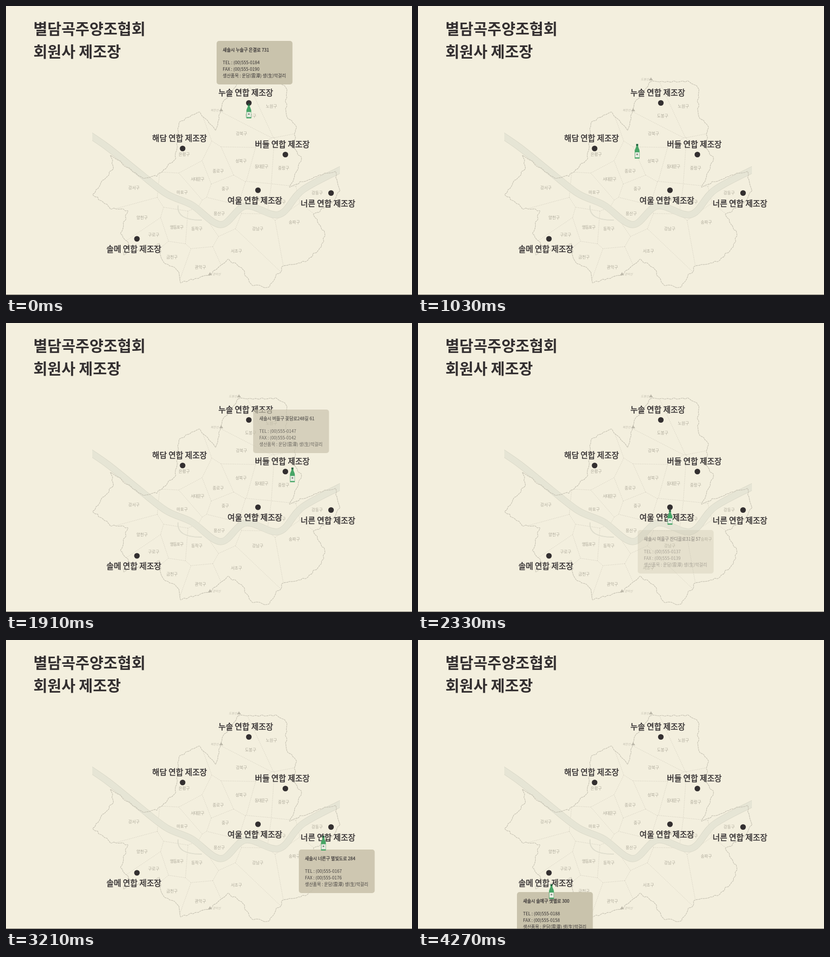
Recreate the animation shown at these times as an HTML page with a canvas. Size 800 px wide and 571 px high, loop 4.33 s.

```html
<!DOCTYPE html>
<html lang="ko">
<head>
<meta charset="utf-8">
<title>회원사 제조장</title>
<style>
html, body { margin: 0; width: 100%; height: 100%; overflow: hidden; background: #f3efde; }
canvas { display: block; }
</style>
</head>
<body>
<canvas id="stage" width="800" height="571"></canvas>
<script>
const LOOP = 4330, MOVE = 350, PAUSE = 50, FADE_IN = 170, FADE_OUT = 120;
const FONT = '"Noto Sans CJK KR", "Noto Sans CJK", "Noto Sans CJK JP", sans-serif';
const BG = '#f3efde', INK = '#332f30', PALE = '#aeaa9b';

// dot, bottle offset from the dot, panel top, time the bottle arrives
const stops = [
  { name: '누솔', dot: [478.5, 191.5], off: [0, 16], top: 69, arrive: -320,
    addr: '새솔시 누솔구 은결로 731', tel: '(00)555-0184', fax: '(00)555-0190' },
  { name: '해담', dot: [348, 281.5], off: [24, 1], top: 153, arrive: 380,
    addr: '새솔시 해담구 물결로8길 6', tel: '(00)555-0160', fax: '(00)555-0134' },
  { name: '버들', dot: [550.5, 293.5], off: [16, 4], top: 171, arrive: 1250,
    addr: '새솔시 버들구 꽃담로248길 61', tel: '(00)555-0147', fax: '(00)555-0142' },
  { name: '여울', dot: [496.5, 364], off: [0, 20], top: 409, arrive: 2222,
    addr: '새솔시 여울구 잔디골로31길 57', tel: '(00)555-0137', fax: '(00)555-0139' },
  { name: '너른', dot: [640.5, 369.5], off: [-15, 32], top: 414, arrive: 3010,
    addr: '새솔시 너른구 별빛도로 284', tel: '(00)555-0167', fax: '(00)555-0176' },
  { name: '솔메', dot: [258, 460], off: [5, 37], top: 498, arrive: 4022,
    addr: '새솔시 솔메구 샛별로 300', tel: '(00)555-0188', fax: '(00)555-0158' }
];
const districts = [
  ['도봉구', 482, 217], ['노원구', 523, 198], ['강북구', 464, 252], ['은평구', 351, 293],
  ['성북구', 463, 306], ['종로구', 418, 326], ['서대문구', 377, 342], ['동대문구', 503, 317],
  ['중랑구', 547, 320], ['마포구', 347, 368], ['중구', 432, 361], ['강서구', 252, 359],
  ['강동구', 613, 369], ['양천구', 268, 418], ['구로구', 291, 452], ['영등포구', 336, 437],
  ['동작구', 376, 440], ['용산구', 420, 410], ['금천구', 327, 496], ['관악구', 383, 516],
  ['서초구', 454, 484], ['강남구', 496, 440], ['송파구', 568, 427], ['광진구', 540, 387],
  ['성동구', 497, 381]
];
const peaks = [['도봉산', 459, 144, -12], ['북한산', 424, 205, -13], ['관악산', 402, 529, 13]];
const border = [
  [459, 150], [533, 149], [552, 160], [551, 214], [571, 238], [568, 278], [582, 301], [560, 357],
  [628, 331], [649, 328], [657, 366], [645, 386], [607, 412], [628, 450], [622, 475], [591, 505],
  [548, 512], [518, 556], [482, 550], [464, 516], [437, 501], [401, 531], [346, 546], [337, 521],
  [309, 505], [300, 470], [231, 490], [240, 471], [226, 449], [240, 404], [207, 400], [170, 372],
  [212, 320], [206, 295], [270, 340], [298, 335], [334, 302], [340, 231], [380, 209], [414, 246],
  [425, 194]
];
const river = [
  [150, 245], [200, 279], [262, 329], [316, 371], [366, 393], [423, 432],
  [472, 395], [538, 412], [585, 363], [670, 318]
];

const stage = document.getElementById('stage').getContext('2d');
const ramp = (t, start, span) => Math.max(0, Math.min(1, (t - start) / span));
const ease = u => (1 - Math.cos(Math.PI * u)) / 2;

function seeded(seed) {
  return () => (seed = seed * 16807 % 2147483647) / 2147483647;
}

// cy is the middle of the Hangul glyphs
function text(c, str, x, cy, size, { color = INK, weight = 400, align = 'left', thick = 0, style = '' } = {}) {
  c.font = `${style} ${weight} ${size}px ${FONT}`;
  c.textAlign = align;
  c.fillStyle = c.strokeStyle = color;
  c.fillText(str, x, cy + size * .38);
  if (thick) {
    c.lineWidth = thick;
    c.lineJoin = 'round';
    c.strokeText(str, x, cy + size * .38);
  }
}

// Smooth path through all points
function spline(pts) {
  const path = new Path2D();
  const at = i => pts[Math.max(0, Math.min(pts.length - 1, i))];
  path.moveTo(...pts[0]);
  for (let i = 0; i < pts.length - 1; i++) {
    const [a, b, d, e] = [at(i - 1), at(i), at(i + 1), at(i + 2)];
    path.bezierCurveTo(b[0] + (d[0] - a[0]) / 6, b[1] + (d[1] - a[1]) / 6,
      d[0] - (e[0] - b[0]) / 6, d[1] - (e[1] - b[1]) / 6, ...d);
  }
  return path;
}

// Closed border with small random nudges between the key points
function ruggedBorder() {
  const rnd = seeded(11), out = [];
  border.forEach(([x, y], i) => {
    const [u, v] = border[(i + 1) % border.length];
    const n = Math.ceil(Math.hypot(u - x, v - y) / 6);
    for (let k = 0; k < n; k++) {
      const f = k / n, nudge = () => (rnd() - .5) * 3.5;
      out.push([x + (u - x) * f + nudge(), y + (v - y) * f + nudge()]);
    }
  });
  const path = spline([...out, out[0]]);
  path.closePath();
  return path;
}

// District lines run halfway between neighbouring district names
function districtLines() {
  const path = new Path2D();
  districts.forEach(([, ax, ay], i) => districts.slice(i + 1).forEach(([, bx, by]) => {
    const mx = (ax + bx) / 2, my = (ay + by) / 2, dx = ay - by, dy = bx - ax;
    let lo = -9, hi = 9;
    for (const [, kx, ky] of districts) {
      if ((kx === ax && ky === ay) || (kx === bx && ky === by)) continue;
      const nx = kx - ax, ny = ky - ay;
      const slope = dx * nx + dy * ny;
      const gap = (kx * kx + ky * ky - ax * ax - ay * ay) / 2 - mx * nx - my * ny;
      if (slope > 0) hi = Math.min(hi, gap / slope);
      else if (slope < 0) lo = Math.max(lo, gap / slope);
      else if (gap < 0) hi = lo;
    }
    if (lo < hi) {
      path.moveTo(mx + dx * lo, my + dy * lo);
      path.lineTo(mx + dx * hi, my + dy * hi);
    }
  }));
  return path;
}

function drawRiver(c) {
  const path = spline(river);
  c.save();
  c.beginPath();
  c.rect(170, 0, 488, 571);
  c.clip();
  for (const [color, width] of [['#d9d7c7', 13.5], ['#e6e5d5', 12]]) {
    c.strokeStyle = color;
    c.lineWidth = width;
    c.stroke(path);
  }
  c.restore();
  c.beginPath();
  c.moveTo(339, 394);
  c.quadraticCurveTo(336, 424, 386, 423);
  c.strokeStyle = '#dfddcd';
  c.lineWidth = 2;
  c.stroke();
}

function drawMap(c) {
  const edge = ruggedBorder();
  c.fillStyle = BG;
  c.fillRect(0, 0, 800, 571);
  c.save();
  c.clip(edge);
  c.strokeStyle = '#d3cfbf';
  c.lineWidth = .8;
  c.setLineDash([2, 1.5]);
  c.stroke(districtLines());
  c.restore();
  drawRiver(c);
  c.strokeStyle = '#c5c1b2';
  c.lineWidth = 1.1;
  c.setLineDash([4, .8]);
  c.stroke(edge);
  c.setLineDash([]);
  for (const [name, x, y] of districts) {
    c.letterSpacing = name.length > 3 ? '-0.8px' : '0px';
    text(c, name, x, y, 8, { color: PALE, align: 'center' });
  }
  c.letterSpacing = '0px';
  for (const [name, x, y, dx] of peaks) {
    text(c, name, x + dx, y + 1, 5.8, { color: '#c2beaf', align: 'center', style: 'italic' });
    c.fillStyle = '#bdb9aa';
    c.beginPath();
    c.moveTo(x - 4, y + 3);
    c.lineTo(x, y - 3);
    c.lineTo(x + 4, y + 3);
    c.fill();
  }
  text(c, '별담곡주양조협회', 54, 45, 30, { weight: 700 });
  text(c, '회원사 제조장', 54, 90, 30, { weight: 700 });
  for (const { name, dot: [x, y], top } of stops) {
    c.fillStyle = INK;
    c.beginPath();
    c.arc(x, y, 5.5, 0, 7);
    c.fill();
    const side = top < y ? -1 : 1;
    text(c, name + ' 연합 제조장', x - 6, y + side * 20.3, 15.7, { align: 'center', thick: .45 });
  }
}

function drawPanel(c, { dot, top, addr, tel, fax }, alpha) {
  if (alpha <= 0) return;
  const x = Math.round(dot[0] - 63.5);
  c.globalAlpha = alpha;
  c.fillStyle = '#c9c3ac';
  c.beginPath();
  c.roundRect(x, top, 149.5, 86, 5);
  c.fill();
  text(c, addr, x + 12, top + 18, 8.6, { thick: .25 });
  const lines = ['TEL : ' + tel, 'FAX : ' + fax, '생산품목 : 운담(雲潭) 생(生)막걸리'];
  lines.forEach((line, i) => text(c, line, x + 12, top + 43 + i * 12.8, 8.6));
  c.globalAlpha = 1;
}

function drawBottle(c, x, y) {
  c.save();
  c.translate(x, y);
  c.fillStyle = '#47a566';
  c.beginPath();
  c.moveTo(-1.8, -11);
  c.lineTo(1.8, -11);
  c.bezierCurveTo(2, -6, 4.8, -5, 4.8, 0);
  c.lineTo(4.8, 14.5);
  c.lineTo(-4.8, 14.5);
  c.lineTo(-4.8, 0);
  c.bezierCurveTo(-4.8, -5, -2, -6, -1.8, -11);
  c.fill();
  c.fillStyle = '#1f5f3c';
  c.fillRect(-2, -14.5, 4, 3.5);
  c.fillStyle = '#e9ece3';
  c.fillRect(-4, 2, 8.3, 10);
  c.fillStyle = '#7d8079';
  c.beginPath();
  c.arc(0, 6, 1.6, 0, 7);
  c.fill();
  c.restore();
}

function bottleAt(t) {
  return stops.reduce((pos, { dot, off, arrive }) => {
    const k = ease(ramp(t, arrive - MOVE, MOVE));
    return pos.map((p, i) => p + (dot[i] + off[i] - p) * k);
  }, [0, 0]);
}

// A panel opens after the bottle arrives and closes as it leaves
function panelAlpha(t, i) {
  const shown = ramp(t, stops[i].arrive + PAUSE, FADE_IN);
  const next = stops[i + 1];
  return next ? shown * (1 - ramp(t, next.arrive - MOVE, FADE_OUT)) : shown;
}

const map = document.createElement('canvas');
map.width = 800;
map.height = 571;
drawMap(map.getContext('2d'));

function frame() {
  const t = performance.now() % LOOP;
  stage.drawImage(map, 0, 0);
  stops.forEach((s, i) => drawPanel(stage, s, panelAlpha(t, i)));
  drawBottle(stage, ...bottleAt(t));
  stage.fillStyle = '#77746c';
  stage.fillRect(0, 570, 800, 1);
  requestAnimationFrame(frame);
}
frame();
</script>
</body>
</html>
```
